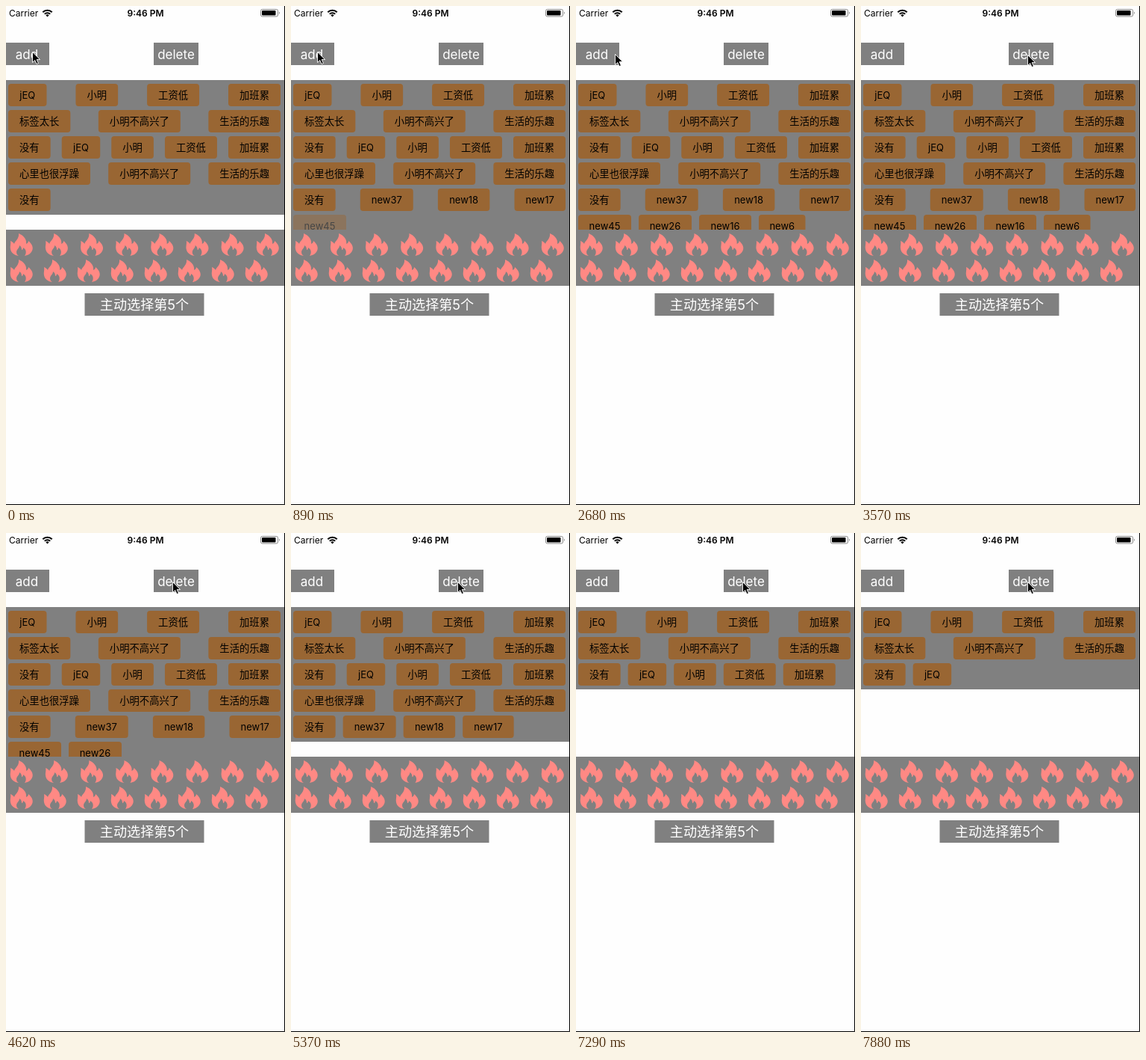
Recreate the animation shown at these times as an HTML page. Size 374 px wide and 667 px high, loop 8 s.

```html
<!DOCTYPE html>
<html lang="zh">
<head>
<meta charset="utf-8">
<title>Tag list</title>
<style>
html, body { margin: 0; width: 100%; height: 100%; overflow: hidden; background: #fefefe; }
svg { display: block; font-family: Inter, "Noto Sans CJK SC", "Noto Sans CJK", sans-serif; }
.mid { text-anchor: middle; }
.tag rect { fill: #963; }
.tag text { font-size: 13px; }
.tag .han { font-size: 13.33px; }
.button text { fill: #fff; font-size: 17px; }
.button .han { font-size: 18.1px; }
</style>
</head>
<body>
<svg width="374" height="667" viewBox="0 0 374 667">
  <defs>
    <path id="flame" fill="#ff8984" d="M14 0C21 3 25 8 24 14C26 13 27 12 27 10C32 14 34 19 32 23C30 27 27 29 22 30C25 26 24 21 20 19C20 21 19 22 18 22C18 19 17 17 15 16C15 20 11 21 11 25C11 27 12 29 14 30C8 29 4 26 3 21C2 17 4 14 3 10C5 11 7 12 8 14C9 10 15 7 14 0Z"/>
  </defs>
  <text x="4" y="13.5" font-size="12">Carrier</text>
  <path d="M49.3 8.3A8.8 8.8 0 0 1 61.7 8.3M51.8 10.8A5.2 5.2 0 0 1 59.2 10.8" fill="none" stroke="#000" stroke-width="2"/>
  <path d="M55.5 14.5L53.4 12.4A3 3 0 0 1 57.6 12.4Z"/>
  <text class="mid" x="187" y="13.5" font-size="12" font-weight="600">9:46 PM</text>
  <rect x="341.5" y="4.5" width="23" height="9.5" rx="2" fill="none" stroke="#888"/>
  <rect x="343" y="6" width="18.5" height="6.5" rx="1"/>
  <path d="M366 7.5Q368 9.2 366 11Z" fill="#888"/>
  <g id="buttons" class="button"></g>
  <rect id="panel" y="99" width="373" fill="gray"/>
  <g id="tags"></g>
  <rect y="299" width="373" height="75" fill="gray"/>
  <g id="flames"></g>
  <path d="M373.5 0V666.5H0" fill="none" stroke="#000"/>
  <path id="cursor" d="M.5 .5V14.5L3.8 11.5L6 16.6L8.4 15.6L6.2 10.6H10.6Z" stroke="#fff" stroke-width=".9"/>
</svg>
<script>
const LOOP = 8000, FIRST = 16;
const $ = id => document.getElementById(id);
const isHan = text => /[\u4e00-\u9fff]/.test(text);

const labels = ('jEQ 小明 工资低 加班累 标签太长 小明不高兴了 生活的乐趣 没有 ' +
  'jEQ 小明 工资低 加班累 心里也很浮躁 小明不高兴了 生活的乐趣 没有 ' +
  'new37 new18 new17 new45 new26 new16 new6').split(' ');
const latinWidth = { jEQ: 51.5, new37: 71, new18: 69.5, new17: 68.5, new45: 71, new26: 71, new16: 70, new6: 62.5 };
const widths = labels.map(s => latinWidth[s] || 30 + 13.33 * s.length);

const added = [290, 590, 740, 890, 1040, 1630, 2380];
const removed = [4170, 4620, 4920, 5370, 5960, 6110, 6260, 6550, 7000, 7150, 7290, 7590, 7740, 7880];
const pointer = [[0, 35, 61], [2680, 52, 64], [2830, 88, 68], [2980, 132, 73], [3130, 176, 77],
  [3280, 212, 77], [3430, 219, 71], [3570, 223, 65]];

// Full rows are justified; the last row keeps a fixed gap.
function layout(sizes) {
  const rows = [[]];
  let x = 3;
  for (const w of sizes) {
    if (x + w > 370) { rows.push([]); x = 3; }
    rows.at(-1).push(w);
    x += w + 10;
  }
  return rows.flatMap((row, r) => {
    const total = row.reduce((a, b) => a + b, 0);
    const gap = r < rows.length - 1 ? (365 - total) / (row.length - 1) : 10;
    let left = 3;
    return row.map(w => {
      const spot = { x: left, y: 5 + 35 * r, w };
      left += w + gap;
      return spot;
    });
  });
}

const label = (text, x, y) =>
  `<text class="mid ${isHan(text) ? 'han' : ''}" x="${x}" y="${y}">${text}</text>`;

const button = (text, x, y, w, mid) =>
  `<rect x="${x}" y="${y}" width="${w}" height="30" fill="gray"/>` + label(text, mid, y + 21.5);

$('buttons').innerHTML = button('add', 0, 49, 58, 28) + button('delete', 198, 49, 60, 228) +
  button('主动选择第5个', 105.5, 384, 160, 185.5);

$('flames').innerHTML = layout(Array(16).fill(35))
  .map(p => `<use href="#flame" x="${p.x}" y="${p.y + 299}"/>`).join('');

let shown = '';
function drawTags(t) {
  const past = times => times.filter(at => at <= t).length;
  const adds = past(added), count = FIRST + adds - past(removed);
  const fading = adds > 0 && t - added[adds - 1] < 150;
  const state = count + ' ' + fading;
  if (state === shown) return;
  shown = state;

  const spots = layout(widths.slice(0, count));
  $('panel').setAttribute('height', spots.at(-1).y + 35);
  $('tags').innerHTML = spots.map(({ x, y, w }, i) =>
    `<g class="tag" opacity="${fading && i === count - 1 ? 0.45 : 1}">` +
    `<rect x="${x}" y="${y + 99}" width="${w}" height="30" rx="4"/>` +
    label(labels[i], x + w / 2, y + 118.7) + '</g>').join('');
}

function frame(now) {
  const t = now % LOOP;
  drawTags(t);
  const [, x, y] = pointer.findLast(p => p[0] <= t);
  $('cursor').setAttribute('transform', `translate(${x} ${y})`);
  requestAnimationFrame(frame);
}
frame(0);
</script>
</body>
</html>
```
